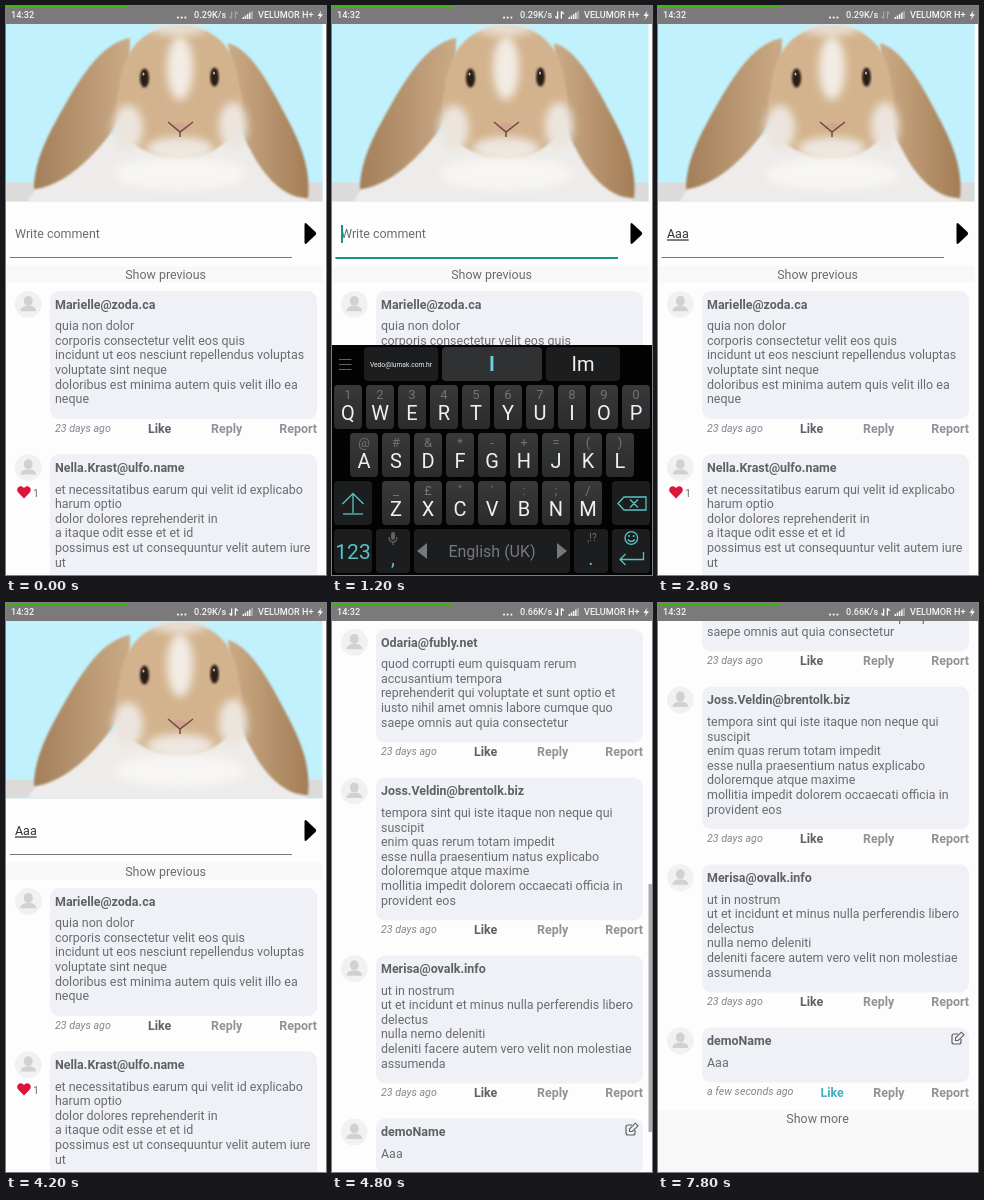
An HTML page for the animation above (8 s loop, 320 by 569 pixels).

```html
<!DOCTYPE html>
<html lang="en">
<head>
<meta charset="utf-8">
<title>Comment feed</title>
<style>
html, body { margin: 0; width: 100%; height: 100%; overflow: hidden; background: #fefdfe; }
svg { display: block; width: 320px; height: 569px; font: 12.44px Roboto, sans-serif; fill: #6b6c6f; }
.name { font-weight: 700; fill: #606164; }
.act { font-weight: 700; fill: #919296; }
.like { font-weight: 700; fill: #606164; }
.ago { font-size: 10.67px; font-style: italic; fill: #85868a; }
.mid { text-anchor: middle; }
.end { text-anchor: end; }
.bar { font-size: 9.1px; font-weight: 500; fill: #f4f4f4; }
.typed { fill: #333; text-decoration: underline; }
.key { font-size: 20px; fill: #f0f0f0; text-anchor: middle; }
.hint { font-size: 13px; fill: #737476; text-anchor: middle; }
.pick { font-weight: 700; fill: #6fd0da; }
.tiny { font-size: 6.7px; }
.num { font-size: 21px; }
.teal { fill: #58c3c4; }
.line { fill: none; stroke: #58c3c4; stroke-width: 1.3; }
.feed { animation: scroll 8s step-end infinite; }
.thumb { animation: thumb 8s step-end infinite; }
.mine { animation: liked 8s step-end infinite; }
@keyframes scroll {
  0% { transform: translateY(7px); }
  60% { transform: translateY(0); }
  70%, 100% { transform: translateY(-91px); }
}
@keyframes thumb {
  0% { opacity: 0; transform: translateY(278px); }
  57.5% { opacity: 1; transform: translateY(278px); }
  60% { opacity: 1; transform: translateY(281px); }
  65% { opacity: .5; transform: translateY(281px); }
  67.5% { opacity: 0; transform: translateY(281px); }
  70% { opacity: 1; transform: translateY(321px); }
  77.5% { opacity: .5; transform: translateY(321px); }
  80%, 100% { opacity: 0; transform: translateY(321px); }
}
@keyframes liked {
  0% { fill: #606164; }
  97.5%, 100% { fill: #43b0c2; }
}
</style>
</head>
<body>
<svg id="stage" viewBox="0 0 320 569" xmlns="http://www.w3.org/2000/svg"></svg>
<script>
const LOOP = 8000;
const rules = [];

// Wraps markup so it is visible only in the given [from, to] spans (ms).
function during(spans, body) {
  const name = 'show' + rules.length;
  const steps = spans.map(([a, b]) =>
    `${a / LOOP * 100}%{opacity:1}${b / LOOP * 100}%{opacity:0}`).join('');
  rules.push(`@keyframes ${name}{0%{opacity:0}${steps}}`);
  return `<g style="animation:${name} ${LOOP}ms step-end infinite">${body}</g>`;
}

const text = (x, y, s, cls = '') => `<text x="${x}" y="${y}" class="${cls}">${s}</text>`;
const box = (x, y, w, h, fill, r = 0) =>
  `<rect x="${x}" y="${y}" width="${w}" height="${h}" rx="${r}" fill="${fill}"/>`;
const path = (d, fill, extra = '') => `<path d="${d}" fill="${fill}" ${extra}/>`;
const oval = (x, y, rx, ry, fill, extra = '') =>
  `<ellipse cx="${x}" cy="${y}" rx="${rx}" ry="${ry}" fill="${fill}" ${extra}/>`;
const line = (d, extra = '') => `<path class="line" d="${d}" ${extra}/>`;

const defs = `<defs>
  <clipPath id="frame"><rect y="17" width="316.5" height="178.5"/></clipPath>
  <filter id="soft"><feGaussianBlur stdDeviation="1"/></filter>
  <filter id="fur" x="-50%" y="-50%" width="200%" height="200%"><feGaussianBlur stdDeviation="4.5"/></filter>
  <linearGradient id="earL"><stop stop-color="#a37f5a"/><stop offset="1" stop-color="#cbab86"/></linearGradient>
  <linearGradient id="earR"><stop stop-color="#cbab86"/><stop offset="1" stop-color="#a37d56"/></linearGradient>
  <linearGradient id="cap" x2="0" y2="1"><stop stop-color="#38393b"/><stop offset="1" stop-color="#2a2b2d"/></linearGradient>
</defs>`;

function photo() {
  const fur = 'filter="url(#fur)"', soft = 'filter="url(#soft)"';
  return `<g clip-path="url(#frame)">` +
    box(0, 17, 317, 179, '#c1f1fc') + box(0, 176.5, 317, 19, '#dddbd9') +
    path('M22 197C26 178 60 168 92 138C112 112 234 112 248 145C262 172 290 180 303 197Z', '#eeecea', soft) +
    path('M124 32C97 37 78 66 60 97C46 122 28 152 28 183C52 181 80 160 104 128C118 110 124 80 124 32Z', 'url(#earL)', soft) +
    path('M222 37C246 44 264 80 281 112C296 140 305 165 302 192C280 193 258 172 244 143C230 120 226 80 222 37Z', 'url(#earR)', soft) +
    path('M173 20C208 19 230 42 233 78C244 112 226 150 173 153C118 150 103 112 113 82C117 43 137 21 173 20Z', '#d3b38d', soft) +
    oval(173, 23, 28, 6, '#eae3da', fur) +
    oval(174, 62, 13, 32, '#f2ece4', fur) +
    oval(122, 122, 15, 23, '#ece5de', fur) + oval(227, 120, 14, 24, '#ece5de', fur) +
    oval(174, 143, 34, 12, '#eee7e0', fur) +
    oval(174, 168, 66, 16, '#f7f6f5', fur) +
    oval(138.5, 72, 4.6, 9.5, '#2a1d18', soft) + oval(208.5, 71, 4.4, 9.5, '#2a1d18', soft) +
    oval(137.5, 68, 1, 1.5, '#bbb') + oval(208, 67, 1, 1.5, '#bbb') +
    oval(174, 121, 8, 4, '#d3a391', soft) +
    path('M162 116L174 126L187 116M174 126V131', 'none', 'stroke="#6d4a3b" stroke-width="1.5"') +
    `</g>`;
}

function avatar(y) {
  return oval(22.3, y, 13.4, 13.4, '#f1f1f2') + oval(22.3, y - 3.4, 4.4, 5, '#d1d1d2') +
    path(`M14.5 ${y + 7}q0-4 5-5.2h5.6q5 1.2 5 5.2z`, '#d1d1d2');
}

// One comment; `top` is the card's upper edge.
function comment(top, who, lines, mine = false) {
  const h = 55 + 14.6 * (lines.length - 1), foot = top + h + 14;
  const shift = mine ? 20.5 : 0;
  return avatar(top + 13.3) + box(44, top, 267, h, '#eff1f6', 9) +
    text(49, top + 17.6, who, 'name') +
    lines.map((s, i) => text(49, top + 39.2 + 14.6 * i, s)).join('') +
    text(49, foot - 1.5, mine ? 'a few seconds ago' : '23 days ago', 'ago') +
    text(142 + shift, foot, 'Like', mine ? 'like mine' : 'like') +
    text(205 + shift / 2, foot, 'Reply', 'act') + text(311, foot, 'Report', 'act end');
}

function statusBar() {
  const arrow = (x, d) => `<path d="M${x} 5.5V12.5${d}" fill="none" stroke="#fff" stroke-width="1.2"/>`;
  const left = arrow(225.6, 'M223.4 10.3L225.6 12.7'), right = arrow(229.4, 'M229.4 5.3L231.8 7.8');
  const bars = [0, 1, 2, 3, 4].map(i => box(236.5 + 2.2 * i, 11 - 1.5 * i, 1.5, 2 + 1.5 * i, i < 4 ? '#f4f4f4' : '#b5b4b4')).join('');
  return box(0, 0, 320, 18, '#7b7979') + box(0, 0, 121, 2, '#3db60c') +
    text(5, 12.4, '14:32', 'bar') +
    [172, 175.7, 179.4].map(x => oval(x, 11.6, 1.1, 1.1, '#f4f4f4')).join('') +
    during([[0, 4600]], text(188, 12.4, '0.29K/s', 'bar')) +
    during([[4600, LOOP]], text(188, 12.4, '0.66K/s', 'bar')) +
    `<g opacity=".35">${left}${right}</g>` +
    during([[1200, 2000], [4200, LOOP]], left) + during([[1200, 2000], [3000, LOOP]], right) +
    bars + text(252, 12.4, 'VELUMOR', 'bar') + text(296, 12.4, 'H+', 'bar') +
    path('M315.5 4.5L311.5 10H314L312.5 14L317 8.3H314.4Z', '#f4f4f4');
}

function editor() {
  const caret = x => box(x, 219, 2, 18, '#159488');
  const step = (a, b, s, x) => during([[a, b]], text(9, 232.4, s, 'typed') + caret(x));
  return path('M298.5 219Q298.5 215.5 301 218L309.5 226Q311 227.6 309.5 229L301 237Q298.5 239.5 298.5 236Z', '#000') +
    box(3.5, 251, 282.5, 1, '#77787a') +
    during([[1000, 2800]], box(3.5, 251, 282.5, 2, '#159488')) +
    during([[0, 1600]], text(9, 232.4, 'Write comment')) +
    during([[1000, 1600]], caret(9)) +
    step(1600, 2000, 'A', 17) + step(2000, 2200, 'Aa', 23.8) + step(2200, 2800, 'Aaa', 30.2) +
    during([[2800, 4600]], text(9, 232.4, 'Aaa', 'typed'));
}

function keyboard() {
  const cap = (x, y, w, fill = 'url(#cap)') => box(x, y, w, 44, fill, 4);
  const darkCap = (x, y, w) => cap(x, y, w, '#1c1d1f');
  const rows = [
    [16, 379, 'qwertyuiop', '1234567890'],
    [32, 427, 'asdfghjkl', '@#&*-+=()'],
    [64, 475, 'zxcvbnm', '_£"\':;/']
  ];
  const each = f => rows.map(([x, y, keys, hints]) =>
    [...keys].map((k, i) => f(x + 32 * i, y, k, hints[i])).join('')).join('');
  const letters = up => each((x, y, k) => text(x, y + 35, up ? k.toUpperCase() : k, 'key'));
  const picks = (a, b, first, second, third, small = '') => during([[a, b]],
    text(69, small ? 360.5 : 365, first, 'key ' + small) +
    text(160, 365, second, 'key pick') + text(251, 365, third, 'key'));

  return box(0, 339, 320, 230, '#030304') +
    [353, 358, 363].map(y => box(7, y, 12.5, 1, '#606163')).join('') +
    box(32, 341, 74, 34, '#1c1d1f', 4) + box(110, 341, 100, 34, '#303133', 4) + box(214, 341, 74, 34, '#1c1d1f', 4) +
    picks(1200, 1600, 'Vedo@lumak.com.hr', 'I', 'Im', 'tiny') +
    picks(1600, 2000, 'And', 'A', 'Aa') +
    picks(2000, 2200, 'A', 'Aa', 'Aaa') +
    picks(2200, 2800, 'Aaaa', 'Aaa', 'Aaaaa') +
    each((x, y, k, hint) => cap(x - 14, y, 28) + text(x, y + 14, hint, 'hint')) +
    darkCap(2, 475, 38) + line('M21 507V488M10.5 498L21 487.5L31.5 498') +
    during([[1200, 1600]], letters(true) + line('M11 508H31')) + during([[1600, 2800]], letters(false)) +
    darkCap(280, 475, 38) + line('M286 497.5L292 491H314V504H292ZM298 493.5L306 501.5M306 493.5L298 501.5') +
    darkCap(2, 523, 38) + text(21, 552.5, '123', 'key num teal') +
    darkCap(44, 523, 34) + box(59, 526, 4, 8, '#606163', 2) +
    line('M57 531Q57 536 61 536Q65 536 65 531M61 536V539', 'style="stroke:#606163"') +
    text(61, 559, ',', 'key teal') +
    darkCap(82, 523, 156) + path('M95 537V553L85 545Z', '#77787a') + path('M225 537V553L235 545Z', '#77787a') +
    `<g font-size="16" fill="#77787a">${text(160, 550.5, 'English (UK)', 'mid')}</g>` +
    darkCap(242, 523, 34) + `<g font-size="10" fill="#737476">${text(260, 535, ',!?', 'mid')}</g>` + text(259, 559, '.', 'key teal') +
    darkCap(280, 523, 38) + line('M293 532a6.3 6.3 0 1 0 12.6 0a6.3 6.3 0 1 0-12.6 0M295.8 533.5q3.5 4 7 0') +
    `<g class="teal">${oval(297, 530, 1, 1, 'inherit')}${oval(301.6, 530, 1, 1, 'inherit')}</g>` +
    line('M311.5 546V553.5H288M293.5 548L288 553.5L293.5 559');
}

const post = box(0, 0, 320, 569, '#fefdfe') + photo() + box(0, 260, 317, 16.5, '#f9f8f9') +
  text(159.6, 272.8, 'Show previous', 'mid') +
  comment(285, 'Marielle@zoda.ca', ['quia non dolor', 'corporis consectetur velit eos quis',
    'incidunt ut eos nesciunt repellendus voluptas', 'voluptate sint neque',
    'doloribus est minima autem quis velit illo ea', 'neque']) +
  comment(448.3, 'Nella.Krast@ulfo.name', ['et necessitatibus earum qui velit id explicabo', 'harum optio',
    'dolor dolores reprehenderit in', 'a itaque odit esse et et id',
    'possimus est ut consequuntur velit autem iure', 'ut']) +
  path('M18 492.5L12.2 486.6C9 482.6 14.2 477.8 18 482C21.8 477.8 27 482.6 23.8 486.6Z', '#dc143c') +
  `<g font-size="10.67">${text(27, 490.5, '1')}</g>` + editor();

const feed = box(0, 0, 320, 569, '#fefdfe') + '<g class="feed">' +
  comment(26, 'Odaria@fubly.net', ['quod corrupti eum quisquam rerum', 'accusantium tempora',
    'reprehenderit qui voluptate et sunt optio et', 'iusto nihil amet omnis labore cumque quo',
    'saepe omnis aut quia consectetur']) +
  comment(174.7, 'Joss.Veldin@brentolk.biz', ['tempora sint qui iste itaque non neque qui', 'suscipit',
    'enim quas rerum totam impedit', 'esse nulla praesentium natus explicabo', 'doloremque atque maxime',
    'mollitia impedit dolorem occaecati officia in', 'provident eos']) +
  comment(352.4, 'Merisa@ovalk.info', ['ut in nostrum', 'ut et incidunt et minus nulla perferendis libero',
    'delectus', 'nulla nemo deleniti', 'deleniti facere autem vero velit non molestiae', 'assumenda']) +
  comment(515.6, 'demoName', ['Aaa'], true) +
  path('M303 527V530Q303 532 301 532H296Q294 532 294 530V524Q294 522 296 522H300', 'none', 'stroke="#606164" stroke-width="1.2"') +
  path('M297.5 528.5V526L303.3 520.2L306 522.8L300.2 528.5Z', 'none', 'stroke="#606164" stroke-width="1.1"') +
  box(0, 598, 320, 70, '#f9f8f9') + text(159.6, 611.3, 'Show more', 'mid') + '</g>';

document.getElementById('stage').innerHTML = defs + post +
  during([[1200, 2800]], keyboard()) + during([[4600, LOOP]], feed) +
  `<g class="thumb">${box(316.5, 0, 3.5, 248, '#adadae')}</g>` + statusBar();

const sheet = document.createElement('style');
sheet.textContent = rules.join('\n');
document.head.append(sheet);
</script>
</body>
</html>
```
